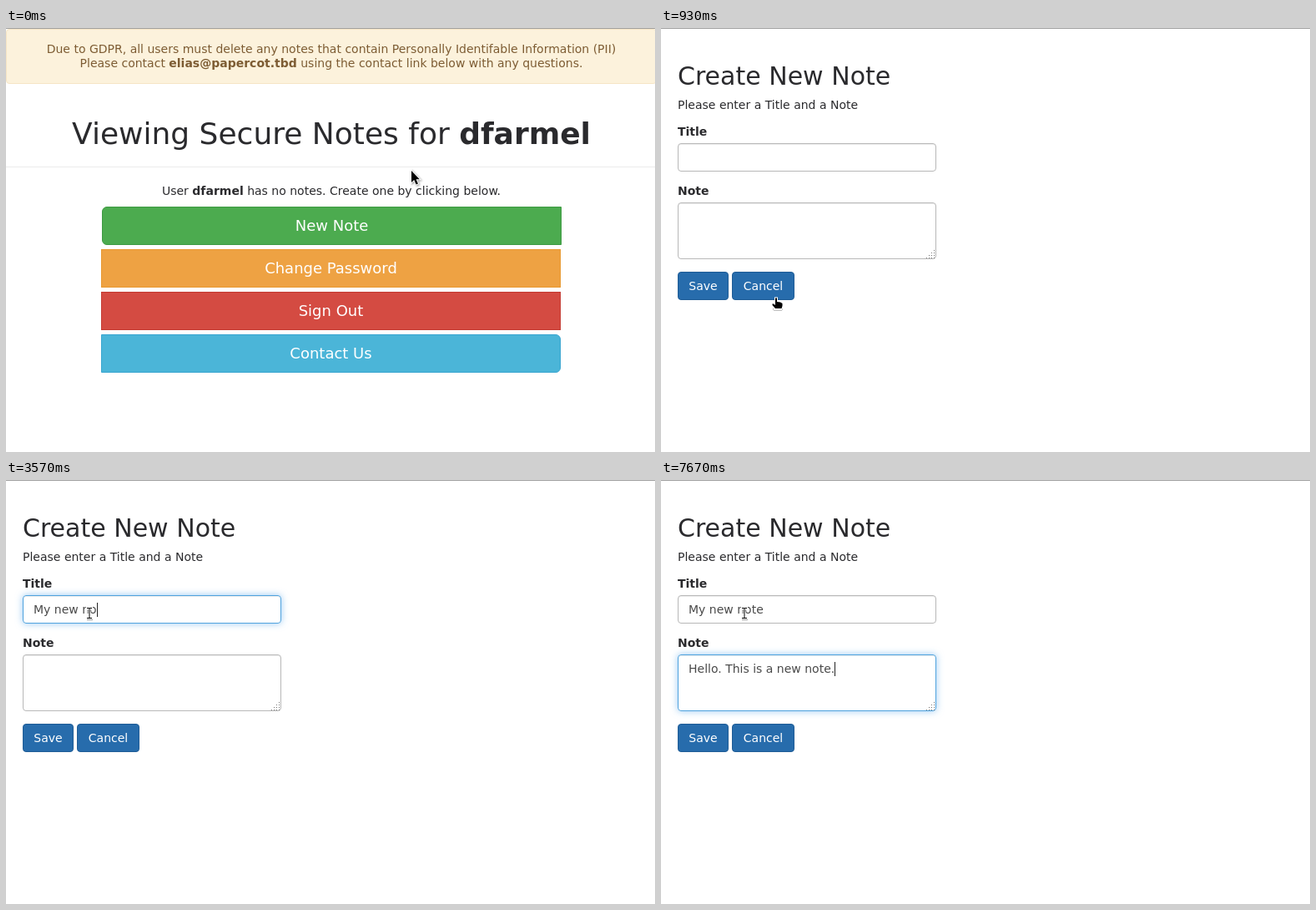
Write an HTML page that moves like this. It is 778x508 px and loops after 8 s.

```html
<!DOCTYPE html>
<html lang="en">
<head>
<meta charset="utf-8">
<title>Secure notes</title>
<style>
html, body { margin: 0; width: 100%; height: 100%; overflow: hidden; background: #fff; }
body { position: relative; font: 14px/20px "DejaVu Sans", sans-serif; color: #2a2a2d; }
div, svg { position: absolute; box-sizing: border-box; white-space: pre; }
.page { left: 0; top: 0; width: 780px; height: 508px; }
.mid { left: 0; width: 780px; text-align: center; }
.rule { left: 0; width: 780px; height: 1px; }
.alert { left: 0; top: 1px; width: 780px; height: 66px; background: #fcf2dc;
  border: 1px solid #f6e5c5; border-radius: 4px; }
.brown { color: #7d5c33; }
.big { left: 114px; width: 551px; height: 46px; padding: 10px 0; border: 1px solid;
  font-size: 18px; line-height: 24px; text-align: center; }
.big span, .btn span { color: #fff; }
.btn { top: 292px; height: 34px; padding: 6px 0; text-align: center; background: #276cac;
  border: 1px solid #1f5c96; border-radius: 4px; }
.field { left: 20px; width: 310px; padding: 6px 12px; border: 1px solid #b8b8b8; border-radius: 4px; color: #4a4a4a; }
.caret { display: inline-block; width: 1px; height: 17px; margin-right: -1px;
  background: #222; vertical-align: -4px; }
.grip { left: 318px; top: 266px; width: 10px; height: 10px;
  background: conic-gradient(at 1px 1px, transparent 75%, #777 0) 0 0/3px 3px;
  clip-path: polygon(85% 0, 100% 0, 100% 100%, 0 100%, 0 85%); }
#green { left: 115px; top: 214px; border-radius: 6px 0 0 6px; }
svg { left: 0; top: 0; overflow: visible; }
[hidden] { display: none; }
</style>
</head>
<body>
<div class="page" id="list">
  <div class="alert"></div>
  <div class="mid brown" style="top:15px">Due to GDPR, all users must delete any notes that contain Personally Identifable Information (PII)</div>
  <div class="mid brown" style="top:32px">Please contact <b>elias@papercot.tbd</b> using the contact link below with any questions.</div>
  <div class="mid" style="top:107px;font-size:36px;line-height:40px">Viewing Secure Notes for <b>dfarmel</b></div>
  <div class="rule" style="top:166px;background:#ebebeb"></div>
  <div class="mid" style="top:185px">User <b>dfarmel</b> has no notes. Create one by clicking below.</div>
  <div class="big" id="green"><span>New Note</span></div>
  <div class="big" style="top:265px;background:#eea243;border-color:#e8982f"><span>Change Password</span></div>
  <div class="big" style="top:316px;background:#d44b42;border-color:#c43a32"><span>Sign Out</span></div>
  <div class="big" style="top:367px;background:#4bb5d8;border-color:#38a5d0;border-radius:0 6px 6px 0"><span>Contact Us</span></div>
</div>
<div class="page" id="form">
  <div style="left:20px;top:38px;font-size:30px;line-height:40px">Create New Note</div>
  <div style="left:20px;top:82px">Please enter a Title and a Note</div>
  <div style="left:20px;top:114px"><b>Title</b></div>
  <div class="field" id="title" style="top:138px;height:34px"><span></span><i class="caret"></i></div>
  <div style="left:20px;top:185px"><b>Note</b></div>
  <div class="field" id="note" style="top:209px;height:68px"><span></span><i class="caret"></i></div>
  <div class="grip"></div>
  <div class="btn" style="left:20px;width:61px"><span>Save</span></div>
  <div class="btn" style="left:85px;width:75px"><span>Cancel</span></div>
</div>
<div class="rule" style="top:0;background:#a0a0a0"></div>
<svg id="cursor" width="1" height="1" stroke="#fff" stroke-width="2" paint-order="stroke">
  <path id="arrow" d="M0 0V14L3.2 11 5.6 16.5 8 15.4 5.6 10.2H9.8Z" style="filter:drop-shadow(1px 1px 1px #0006)"/>
  <g id="hand">
    <path d="M-3 12.500H7V15H-3Z" fill="#fff" stroke="#888" stroke-width="1"/>
    <path d="M-1 .5H1V5L5 5.500 7.500 7V10L6.500 13H-1L-4.500 9V7.500H-3L-1 9Z"/>
  </g>
  <g id="beam">
    <path d="M-3 8.500H4" stroke="#999" stroke-width="1"/>
    <path d="M-3-6H-.500L0-5.500 .5-6H3V-5H.5V6H3V7H-3V6H-.500V-5H-3Z"/>
  </g>
</svg>
<script>
const LOOP = 8000, FORM_AT = 870, CLICK = 1900, TAB = 3970;
const $ = id => document.getElementById(id);

// [time, x, y]
const path = [[30, 486, 171], [500, 378, 236], [640, 378, 236], [930, 138, 323],
  [1630, 112, 310], [1730, 110, 309], [1900, 100, 159]];
// [time, letters typed]
const titleKeys = [[2600, 1], [2870, 2], [3670, 10], [3770, 11]];
const noteKeys = [[4500, 1], [4630, 2], [4770, 3], [5030, 5], [5400, 6], [5630, 7],
  [5930, 8], [6330, 9], [7070, 19], [7170, 20], [7670, 26]];

function at(keys, t, i) {
  const n = keys.findIndex(k => k[0] > t);
  if (n < 0) return keys[keys.length - 1][i];
  if (n === 0) return keys[0][i];
  const a = keys[n - 1], b = keys[n];
  return a[i] + (b[i] - a[i]) * (t - a[0]) / (b[0] - a[0]);
}

const fade = (t, start) => Math.min(1, Math.max(0, (t - start) / 150));

function field(id, text, keys, t, glow, active) {
  const el = $(id), count = t < keys[0][0] ? 0 : Math.floor(at(keys, t, 1) + 1e-6);
  el.firstChild.textContent = text.slice(0, count);
  el.lastChild.hidden = !active;
  const mix = (a, b) => Math.round(a + (b - a) * glow);
  el.style.borderColor = `rgb(${mix(184, 80)},${mix(184, 163)},${mix(184, 222)})`;
  el.style.boxShadow = `inset 0 1px 1px #00000013, 0 0 8px rgba(85,165,235,${0.6 * glow})`;
}

function drawGreen(t, over) {
  const pressed = t >= 530 && t < 650, focus = t >= 530, s = $("green").style;
  s.background = pressed ? "#2b752f" : over || focus ? "#3a9040" : "#4cab4f";
  s.borderColor = focus ? "#1c4a20" : over ? "#2f7d34" : "#3d9a41";
  s.outline = focus ? "1px dotted #111" : "none";
  s.outlineOffset = "-1px";
}

function drawCursor(x, y, onForm) {
  const hand = onForm ? y >= 292 && y < 326 && x >= 20 && x < 160
    : y >= 214 && x >= 114 && x < 665;
  const beam = onForm && x < 330 && (y >= 138 && y < 172 || y >= 209 && y < 277);
  const kind = hand ? "hand" : beam ? "beam" : "arrow";
  for (const id of ["arrow", "hand", "beam"]) $(id).style.display = id === kind ? "" : "none";
  $("cursor").style.transform = `translate(${Math.round(x)}px,${Math.round(y)}px)`;
}

function draw(t) {
  const onForm = t >= FORM_AT, x = at(path, t, 1), y = at(path, t, 2);
  $("list").hidden = onForm;
  $("form").hidden = !onForm;
  drawGreen(t, y >= 214);
  field("title", "My new note", titleKeys, t, fade(t, CLICK) - fade(t, TAB), t >= CLICK && t < TAB);
  field("note", "Hello. This is a new note.", noteKeys, t, fade(t, TAB), t >= TAB);
  drawCursor(x, y, onForm);
}

let start;
function tick(now) {
  start ??= now;
  draw((now - start) % LOOP);
  requestAnimationFrame(tick);
}
draw(0);
requestAnimationFrame(tick);
</script>
</body>
</html>
```
